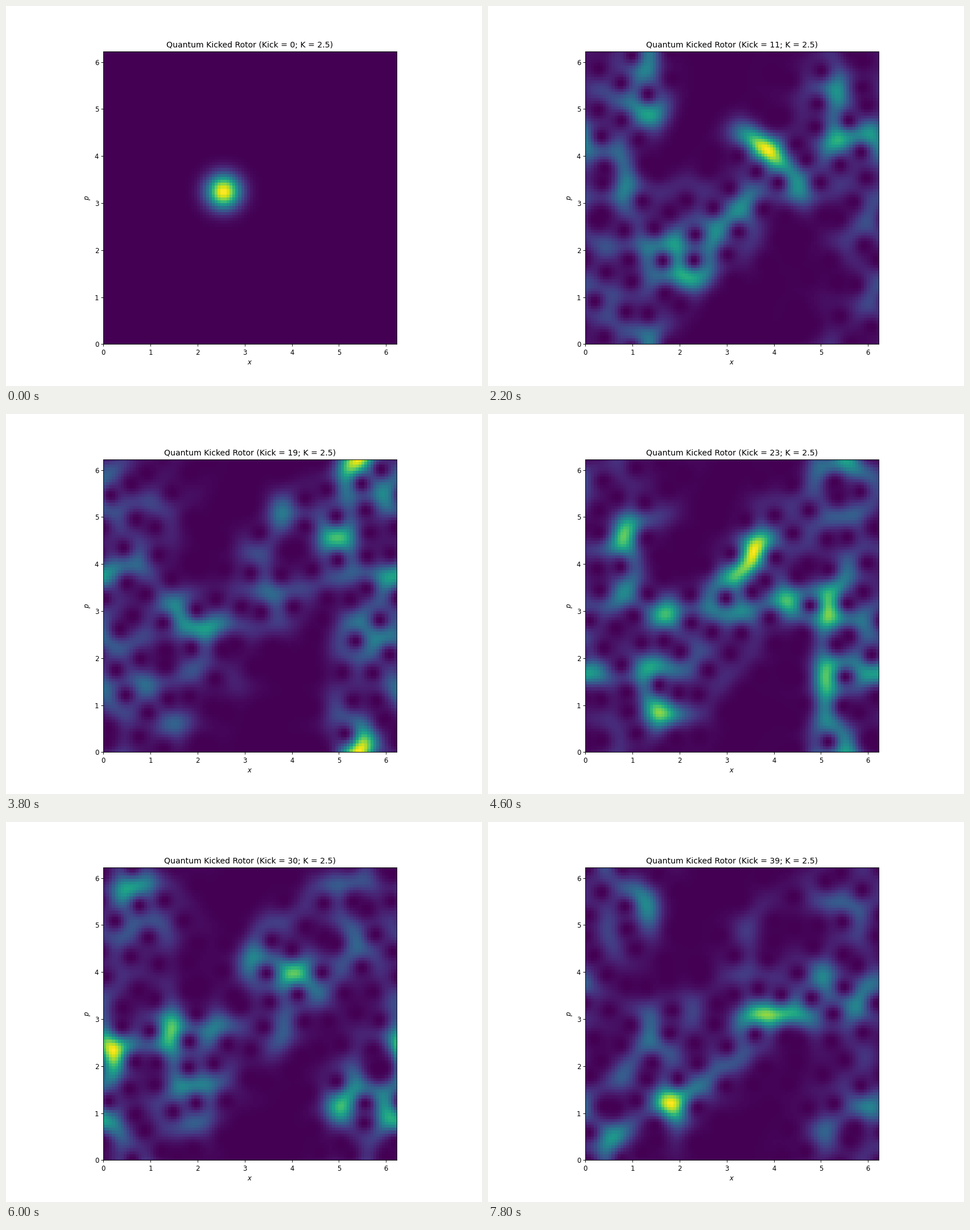
These frames come from a looping animation (837x669 px, 8000 ms). A matplotlib script:

```python
import numpy as np
import matplotlib.pyplot as plt
from matplotlib.animation import FuncAnimation

W, H, DPI = 837, 669, 83.7
N = 100                    # Hilbert space dimension on the torus
HBAR = 2 * np.pi / N
K = 2.5
X0, P0 = 2.545, 3.236      # centre of the starting coherent state
FRAMES, INTERVAL = 40, 200

index = np.arange(N)
x = HBAR * index
p = HBAR * index

kick = np.exp(-1j * K * np.cos(x) / HBAR)
drift = np.exp(-1j * p**2 / (2 * HBAR))


def packet(d):
    """Minimum-uncertainty Gaussian of the distance d, wrapped on the circle."""
    d = (d + np.pi) % (2 * np.pi) - np.pi
    return np.exp(-d**2 / (2 * HBAR))


windows = packet(x[None, :] - x[:, None])


def husimi(psi):
    """Phase-space density, rows p and columns x."""
    return np.abs(np.fft.fft(windows * psi, axis=1).T) ** 2


def evolve(psi, steps):
    maps = []
    for _ in range(steps):
        maps.append(husimi(psi))
        psi = np.fft.ifft(drift * np.fft.fft(kick * psi))
    return maps


start = packet(x - X0) * np.exp(1j * P0 * x / HBAR)
start /= np.linalg.norm(start)
density = evolve(start, FRAMES)

# the tiny margin keeps the pixel size from rounding down
fig, ax = plt.subplots(figsize=((W + 1e-6) / DPI, (H + 1e-6) / DPI), dpi=DPI)
image = ax.imshow(density[0], origin="lower", cmap="viridis",
                  extent=[x[0], x[-1], p[0], p[-1]])
ax.set_xlabel("$x$")
ax.set_ylabel("$p$")
title = ax.set_title("")


def draw(n):
    image.set_data(density[n])
    image.set_clim(density[n].min(), density[n].max())
    title.set_text(f"Quantum Kicked Rotor (Kick = {n}; K = {K})")
    return image, title


def init():
    return draw(0)


anim = FuncAnimation(fig, draw, frames=FRAMES, init_func=init,
                     interval=INTERVAL, repeat=True, blit=False)
plt.show()
```
